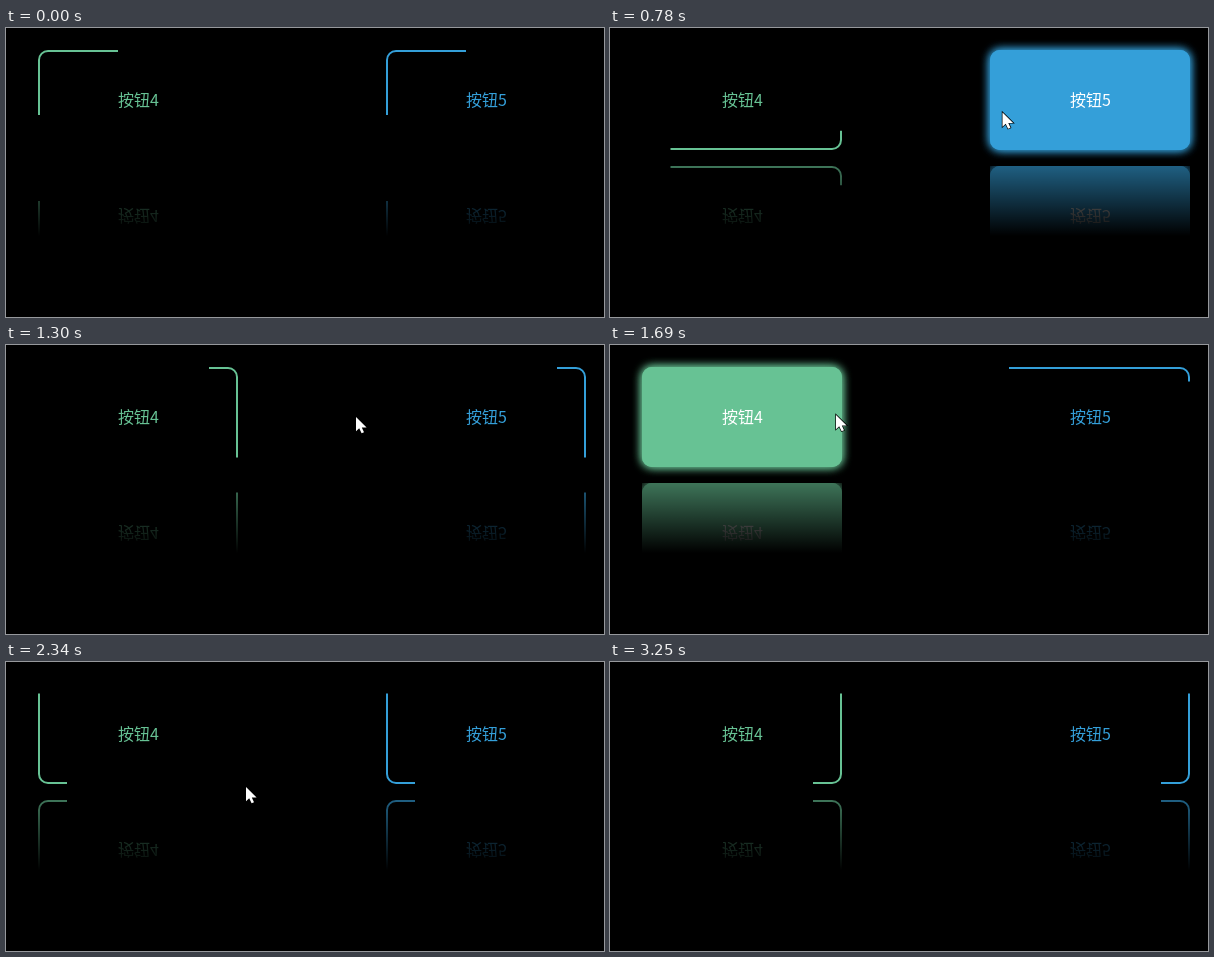
Recreate the animation shown at these times as an HTML page with a canvas. Size 598 by 289 pixels, loop 3.38 s.

```html
<!DOCTYPE html>
<html lang="zh-CN">
<head>
<meta charset="utf-8">
<title>Buttons</title>
<style>
  html, body { margin: 0; width: 100%; height: 100%; overflow: hidden; background: #000; }
  canvas { display: block; }
</style>
</head>
<body>
<canvas id="stage" width="598" height="289"></canvas>
<script>
const ctx = document.getElementById('stage').getContext('2d');
const STEP = 130, STEPS = 26;
const W = 200, H = 100, TOP = 22, GAP = 16, RADIUS = 10;

const buttons = [
  { x: 32, label: '按钮4', color: '#67c294', hover: [13, 17] },
  { x: 380, label: '按钮5', color: '#349fd9', hover: [6, 9] }
];

// Keys: step, then values
const turns = [[0, 0.158], [5, 0.475], [9, 0.725], [10, 0.775], [13, 0.975],
  [15, 1.09], [18, 1.275], [25, 1.725]];
const pointer = [[3, 345, 275], [5, 384, 81], [7, 401, 88], [9, 394, 72], [10, 350, 72],
  [13, 226, 70], [15, 205, 74], [18, 240, 125], [20, 272, 264]];

function sample(keys, step) {
  let i = 0;
  while (i < keys.length - 2 && step > keys[i + 1][0]) i++;
  const [a, b] = [keys[i], keys[i + 1]];
  const p = (step - a[0]) / (b[0] - a[0]);
  return a.slice(1).map((v, k) => v + (b[k + 1] - v) * p);
}

function roundRect(inset) {
  ctx.beginPath();
  ctx.roundRect(inset, inset, W - 2 * inset, H - 2 * inset, RADIUS - inset);
}

// The visible window glides top, left, bottom, right.
function drawBorder(turn, color) {
  const order = ['bottom', 'right', 'top', 'left'];
  const side = Math.floor(turn * 4), p = turn * 4 - side;
  const cut = { top: 0, right: 0, bottom: 0, left: 0 };
  cut[order[side % 4]] = 0.95 * (1 - p);
  cut[order[(side + 1) % 4]] = 0.95 * p;
  ctx.save();
  ctx.beginPath();
  ctx.rect(cut.left * W, cut.top * H, (1 - cut.left - cut.right) * W, (1 - cut.top - cut.bottom) * H);
  ctx.clip();
  roundRect(1);
  ctx.strokeStyle = color;
  ctx.lineWidth = 2;
  ctx.stroke();
  ctx.restore();
}

function drawGlow(color) {
  ctx.save();
  ctx.fillStyle = ctx.shadowColor = color;
  ctx.shadowBlur = 10;
  roundRect(0);
  ctx.fill();
  ctx.fill();
  ctx.restore();
}

function drawFace(button, turn, hovered) {
  if (hovered) drawGlow(button.color);
  else drawBorder(turn, button.color);
  ctx.font = '16px "Noto Sans CJK SC", "Noto Sans CJK", sans-serif';
  ctx.textAlign = 'center';
  ctx.fillStyle = hovered ? '#fff' : button.color;
  ctx.fillText(button.label, W / 2 + 0.4, 56);
}

function drawReflection(button, turn, hovered) {
  const y = TOP + H + GAP;
  ctx.save();
  ctx.beginPath();
  ctx.rect(button.x, y, W, H);
  ctx.clip();
  ctx.translate(button.x, y + H);
  ctx.scale(1, -1);
  drawFace(button, turn, hovered);
  const fade = ctx.createLinearGradient(0, 0, 0, H);
  fade.addColorStop(0.3, '#000');
  fade.addColorStop(1, 'rgba(0,0,0,0.4)');
  ctx.fillStyle = fade;
  ctx.fillRect(0, 0, W, H);
  ctx.restore();
}

function drawPointer(x, y) {
  ctx.save();
  ctx.translate(x, y);
  ctx.beginPath();
  ctx.moveTo(0, 0);
  for (const [px, py] of [[0, 14.2], [3.2, 11.2], [5.6, 16.2], [8, 15.2], [5.8, 10.4], [10.6, 10.4]]) {
    ctx.lineTo(px, py);
  }
  ctx.closePath();
  ctx.strokeStyle = '#000';
  ctx.lineWidth = 1.4;
  ctx.stroke();
  ctx.fillStyle = '#fff';
  ctx.fill();
  ctx.restore();
}

function draw(step) {
  ctx.fillStyle = '#000';
  ctx.fillRect(0, 0, 598, 289);
  const [turn] = sample(turns, step);
  for (const button of buttons) {
    const hovered = step >= button.hover[0] && step <= button.hover[1];
    ctx.save();
    ctx.translate(button.x, TOP);
    drawFace(button, turn, hovered);
    ctx.restore();
    drawReflection(button, turn, hovered);
  }
  if (step >= 3 && step <= 20) drawPointer(...sample(pointer, step));
}

const start = performance.now();
function tick() {
  draw(Math.floor((performance.now() - start) / STEP) % STEPS);
  requestAnimationFrame(tick);
}
tick();
</script>
</body>
</html>
```
